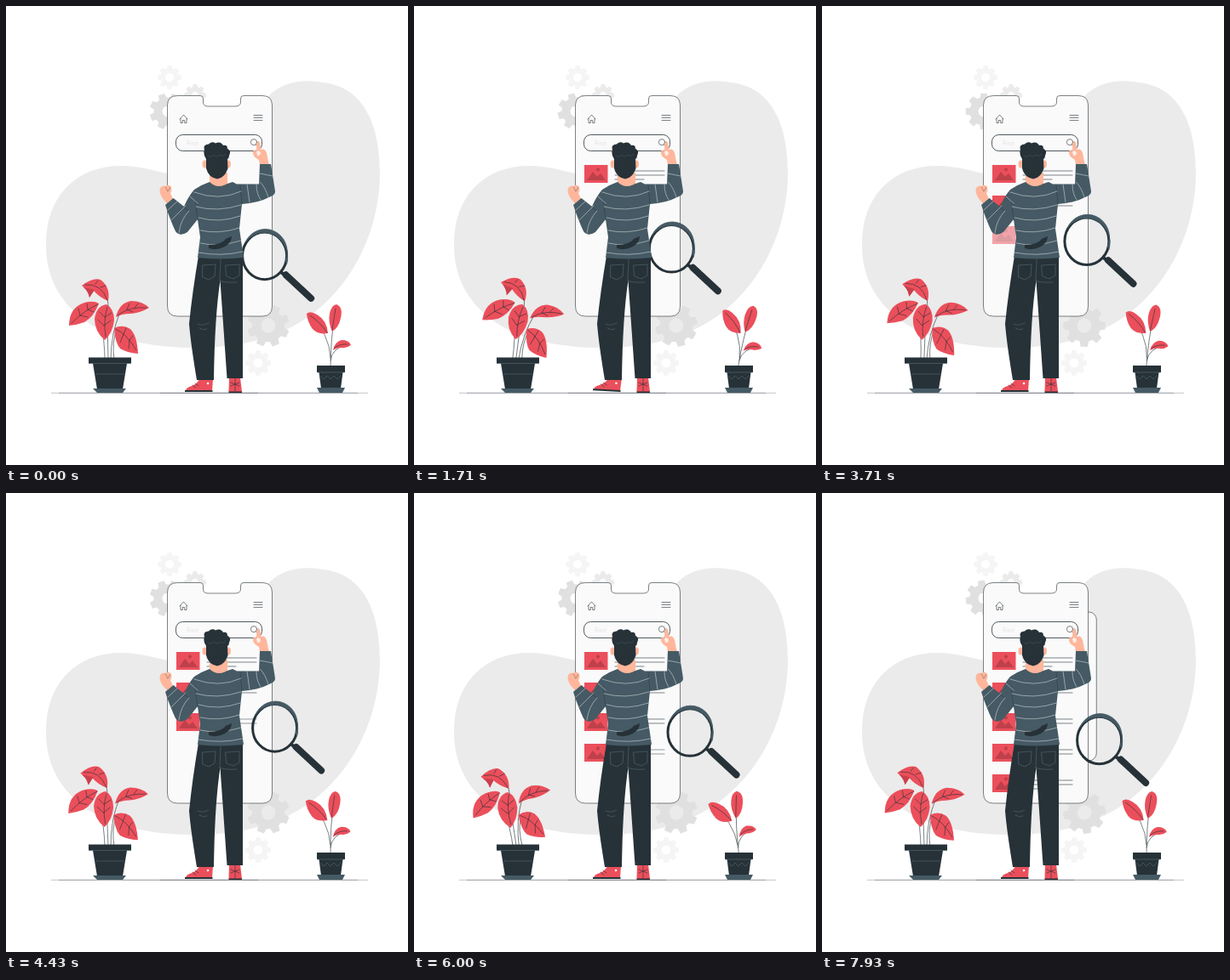
These frames come from a looping animation (472x540 px, 8000 ms). An HTML page:

```html
<!DOCTYPE html>
<html lang="en">
<head>
<meta charset="utf-8">
<title>Search screen</title>
<style>
  html, body { margin: 0; width: 100%; height: 100%; overflow: hidden; background: #fff; }
  svg { display: block; width: 100vw; height: 100vh; }
  .dark { fill: #263238; }
  .slate { fill: #455a64; }
  .red { fill: #eb4f5b; }
  .skin { fill: #ffb69b; }
  .paper { fill: #fafafa; stroke: #263238; stroke-width: .6; }
  .ink, .vein, .stripe, .seam { fill: none; stroke-linecap: round; stroke-linejoin: round; }
  .ink { stroke: #263238; stroke-width: .6; }
  .vein { stroke: #263238; stroke-width: .6; }
  .stripe { stroke: #cfd6d9; stroke-width: .6; }
  .seam { stroke: #52666f; stroke-width: .65; }
</style>
</head>
<body>
<svg viewBox="0 0 472 540">
  <path fill="#ebebeb" d="M47 282C46 225 82 188 135 188C180 188 215 215 245 190C265 170 280 140 307 107C325 88 350 86 372 90C420 95 439 140 439 196C439 250 418 310 372 352C330 390 275 403 215 402C160 401 103 389 71 350C54 330 47 306 47 282Z"/>
  <g id="gears"></g>

  <rect id="backCard" class="paper" x="228" y="140" width="83" height="175" rx="9"/>
  <path class="paper" d="M201.500 105.500H228Q231.500 105.500 231.500 109V113Q231.500 118 237 118H269Q275.500 118 275.500 113V109Q275.500 105.500 279 105.500H301Q312.500 105.500 312.500 117V353Q312.500 365 301 365H201.500Q189.500 365 189.500 353V117Q189.500 105.500 201.500 105.500Z"/>
  <path class="ink" d="M204 133L208.500 128L213 133M205 132.500V137.500H207.300V134.500H209.700V137.500H212V132.500M291 128.500H301M291 131.500H301M291 134.500H301"/>
  <rect class="paper" style="stroke-width:.8" x="199.500" y="151.500" width="101" height="19" rx="8"/>
  <text x="212" y="164" font-family="Lato, Arial, sans-serif" font-size="7.500" fill="#e3e3e3">Free</text>
  <circle class="ink" cx="291" cy="160.200" r="3.600"/>
  <path class="ink" d="M293.600 163L297 166.500"/>
  <g id="rows"></g>

  <g id="lens">
    <path d="M18 18.500L26 24" stroke="#263238" stroke-width="4"/>
    <path d="M25 22.500L54.500 50" stroke="#263238" stroke-width="8" stroke-linecap="round"/>
    <ellipse rx="26" ry="27.800" fill="none" stroke="#263238" stroke-width="3"/>
    <path d="M-23 -15A27.600 29.200 0 0 1 26 10L24.500 6A25 26 0 0 0 -23 -15Z" fill="#455a64" stroke="#455a64" stroke-width=".8"/>
  </g>

  <path d="M53 455.300H425M62 455.300H413M181 455.300H296" fill="none" stroke="#263238" stroke-width=".5" opacity=".55"/>

  <g id="man">
    <g id="foot">
      <path class="red" d="M227 439H243L242 453H211Q211 449 218 447Q225 444 227 439Z"/>
      <path class="dark" d="M210 452H242.500V454H210Z"/>
      <path class="ink" d="M222 444L226 447M219 446L223 449"/>
      <circle cx="237" cy="444" r="1.300" fill="#fff"/>
    </g>
    <path class="red" d="M262 437H275L277 454H261.500Z"/>
    <path class="dark" d="M261.500 453.500H277V455H261.500Z"/>
    <path class="ink" d="M269 438V453M264 443L274 447M274 443L264 447"/>
    <path class="dark" d="M226 294H278V438H259.500L251.500 323Q245 365 244 440H224Q217 398 215 374Q219 335 226 294Z"/>
    <path class="seam" d="M231 305L246 304L245 318L238 322L231 319ZM258 305L274 304V317L267 321L259 318ZM252 298L251 323M251 323Q256 326 271 325M225 374Q230 377 238 373M227 379Q231 382 236 380"/>

    <path class="skin" d="M189 232Q180 224 180.500 216Q182 211 187 212Q190 209 193 212Q196 216 193 220L196 227Z"/>
    <path class="ink" style="stroke-width:.35" d="M187 213L190 218M193 213L190 218"/>
    <path class="skin" d="M298 187L297 181Q289 177 290 171Q292 168 294 171L294.500 161Q296 157 298 161L299.500 169Q304 167 306 173Q307 179 309 187Z"/>
    <path d="M294 171Q298 169 299 173Q298 177 295 176Z" fill="#fff" opacity=".75"/>

    <path class="skin" d="M239 196H260V214Q249 216 239 213Z"/>
    <ellipse class="skin" cx="233.500" cy="186" rx="3" ry="4.500"/>
    <ellipse class="skin" cx="261" cy="186" rx="3" ry="4.500"/>
    <path class="dark" d="M235 180Q231 174 233 169Q231 163 238 162.500Q242 158.500 246 161.500Q252 158.500 255 164Q260 163 260 168Q265 170 262 176Q262 179 260 180L260.500 191Q257 202 248 203.500Q238 202 235 191Z"/>
    <path class="seam" style="stroke-width:.4" d="M237 176Q241 179 243 175Q248 179 251 175Q255 178 258 174"/>

    <path class="slate" d="M239 207Q248 216 260 209L266 207L271 209.500H297L298 186H311L316 218Q316 222 311 224Q296 232 277 233L274 262L279 296Q252 299 225 296L228 272L225 251L213 266Q204 272 199 265Q192 250 187 234L196.500 226L209 236Q214 224 221 216Q230 210 239 207Z"/>
    <path class="ink" style="stroke-width:.45" d="M222 228L225 252M277 233L275 211M209 236L213 240"/>
    <path class="stripe" d="M221 219Q250 230 276 218M223 236Q248 243 276 234M226 249Q250 256 275 247M228 264Q250 269 274 261M228 279Q250 284 276 276M226 290Q252 295 278 289M190 240L201 230M194 252L211 235M203 267Q205 251 215 241M216 224L225 232M283 210L286 231M294 210Q294 221 299 228M298 207Q304 212 308 225M298 197L313 200"/>
    <path class="dark" d="M238 281Q253 281 258 274L265 271Q265 278 257 283Q247 288 238 285Z"/>
  </g>

  <g id="bigPlant">
    <path class="vein" d="M116 416Q116 396 111 366M120 416L119 372Q122 352 118 341M123 416Q123 386 134 360M127 416Q124 395 130 381"/>
    <path class="red" d="M89 329Q102 319 111 322Q123 331 120 347Q110 343 103 335L98 343Q96 334 89 329ZM74 376Q74 355 92 349Q103 346 109 350Q103 366 92 372Q84 375 74 376ZM129 366Q133 349 147 347Q160 347 168 355Q158 361 146 362Q136 362 129 366ZM127 379Q137 374 146 380Q154 388 155 409Q142 408 134 403Q128 396 127 379Z"/>
    <path class="red" d="M116 393Q104 383 104 368Q106 353 118 351Q127 356 127 370Q125 385 116 393Z"/>
    <path d="M91 331L104 334L98 343Q97 336 91 331Z" fill="#c9404d"/>
    <path class="vein" d="M93 328Q112 326 119 346M105 327L108 323M111 331L117 329M77 373Q92 358 108 351M87 364L85 356M87 364L96 366M96 357L95 350M96 357L103 360M117 389Q114 370 119 354M115 376L108 369M115 376L123 370M116 366L110 360M116 366L124 361M131 364Q145 353 165 355M142 357L145 350M142 357L149 360M151 355L155 350M129 380Q142 386 153 405M138 386L141 379M138 386L134 396M145 393L149 388M145 393L144 403"/>
  </g>
  <path class="dark" d="M97 413.500H147V420.500H142L137 451H107L102 420.500H97Z"/>
  <path class="slate" d="M102 450H141L137 455H107Z"/>
  <path class="seam" d="M98 420.500H146M105 433H139"/>

  <g id="smallPlant">
    <path class="vein" d="M381 425Q381 392 387 356M381 414Q380 386 357 364M381 417Q383 402 401 398"/>
    <path class="red" d="M353 362Q357 358 365 363Q377 370 378 385Q366 387 360 380Q354 372 353 362ZM388 351Q396 354 393 367Q391 378 383 383Q378 372 380 362Q382 352 388 351ZM384 405Q386 395 394 393Q403 393 405 399Q400 403 394 402Q388 402 384 405Z"/>
    <path class="vein" d="M357 364Q370 373 377 384M387 356L383 381M386 402Q393 397 401 398"/>
  </g>
  <path class="dark" d="M365 423H398V431H395.500L393 450H370L367.500 431H365Z"/>
  <path class="slate" d="M365 449H398L395 455H368Z"/>
  <path class="seam" d="M366 431H397M369 435L373 439L377 435L381 439L385 435L389 439L393 435"/>
</svg>
<script>
const LOOP = 8000;
const byId = id => document.getElementById(id);
const clamp = v => Math.max(0, Math.min(1, v));
const fade = (t, middle, length = 600) => clamp((t - middle) / length + .5);

function add(parent, name, attrs) {
  const node = document.createElementNS('http://www.w3.org/2000/svg', name);
  for (const key in attrs) node.setAttribute(key, attrs[key]);
  return parent.appendChild(node);
}

// Eight-toothed wheel with a round hole
function gear(x, y, radius, hole, color) {
  const points = [];
  for (let i = 0; i < 8; i++) {
    for (const [turn, scale] of [[-.32, .77], [-.2, 1], [.2, 1], [.32, .77]]) {
      const a = (i + turn) * Math.PI / 4;
      points.push(`${Math.cos(a) * radius * scale} ${Math.sin(a) * radius * scale}`);
    }
  }
  const ring = `M${-hole} 0a${hole} ${hole} 0 1 0 ${2 * hole} 0a${hole} ${hole} 0 1 0 ${-2 * hole} 0Z`;
  const holder = add(byId('gears'), 'g', { transform: `translate(${x} ${y})` });
  return add(holder, 'path', {
    d: `M${points.join('L')}Z${ring}`, fill: color, 'fill-rule': 'evenodd',
    stroke: color, 'stroke-linejoin': 'round'
  });
}

gear(192, 84, 13.5, 5.5, '#f5f5f5');
gear(222, 105, 12.5, 4.5, '#ebebeb');
gear(296, 420, 14.5, 6, '#f5f5f5');
const turning = [gear(190, 124, 21, 7, '#e0e0e0'), gear(308, 376, 24.5, 9, '#e0e0e0')];

const rowTimes = [800, 2230, 3710, 5290, 6830];
const rows = rowTimes.map((time, i) => {
  const holder = add(byId('rows'), 'g', { transform: `translate(200 ${187 + 36 * i})` });
  const picture = add(holder, 'g', {});
  add(picture, 'rect', { width: 27.5, height: 21, class: 'red' });
  add(picture, 'path', { d: 'M3 18L10 8L15 14L19 10L25 18Z', fill: '#bd404a' });
  add(picture, 'circle', { cx: 16, cy: 5.5, r: 2, fill: '#bd404a' });
  const lines = add(holder, 'path', { d: 'M36 7H94M36 12H94M36 17H70', class: 'ink' });
  return { time, picture, lines };
});

// Lens angle on its round path: [time, degrees]
const lensSteps = [[0, -30], [930, -5], [2500, 32], [3710, 75], [5210, 122], [6790, 171], [8000, 196]];
function lensAngle(t) {
  const i = lensSteps.findIndex(step => step[0] > t);
  const [t0, a0] = lensSteps[i - 1], [t1, a1] = lensSteps[i];
  return (a0 + (a1 - a0) * (t - t0) / (t1 - t0)) * Math.PI / 180;
}

const move = (node, value) => node.setAttribute('transform', value);

function draw(t) {
  const sway = 8.2 * (Math.sin(2 * Math.PI * (t - 130) / LOOP) + .1);
  move(byId('bigPlant'), `rotate(${sway} 122 414)`);
  move(byId('smallPlant'), `rotate(${sway} 381 422)`);

  const a = lensAngle(t);
  move(byId('lens'), `translate(${314 - 12 * Math.cos(a)} ${288 - 11.7 * Math.sin(a)})`);

  const tap = t > 300 && t < 2500 ? Math.sin(Math.PI * (t - 300) / 1100) ** 2 : 0;
  move(byId('foot'), `rotate(${5 * tap} 242 453)`);

  turning.forEach(wheel => move(wheel, `rotate(${t * .03 - 21})`));
  const slide = clamp((t - 7500) / 500);
  move(byId('backCard'), `translate(${11.5 * slide * (2 - slide)} 0)`);

  for (const { time, picture, lines } of rows) {
    picture.setAttribute('opacity', fade(t, time));
    lines.setAttribute('opacity', fade(t, time + 600, 400));
  }
}

const start = performance.now();
function tick() {
  draw((performance.now() - start) % LOOP);
  requestAnimationFrame(tick);
}
tick();
</script>
</body>
</html>
```
